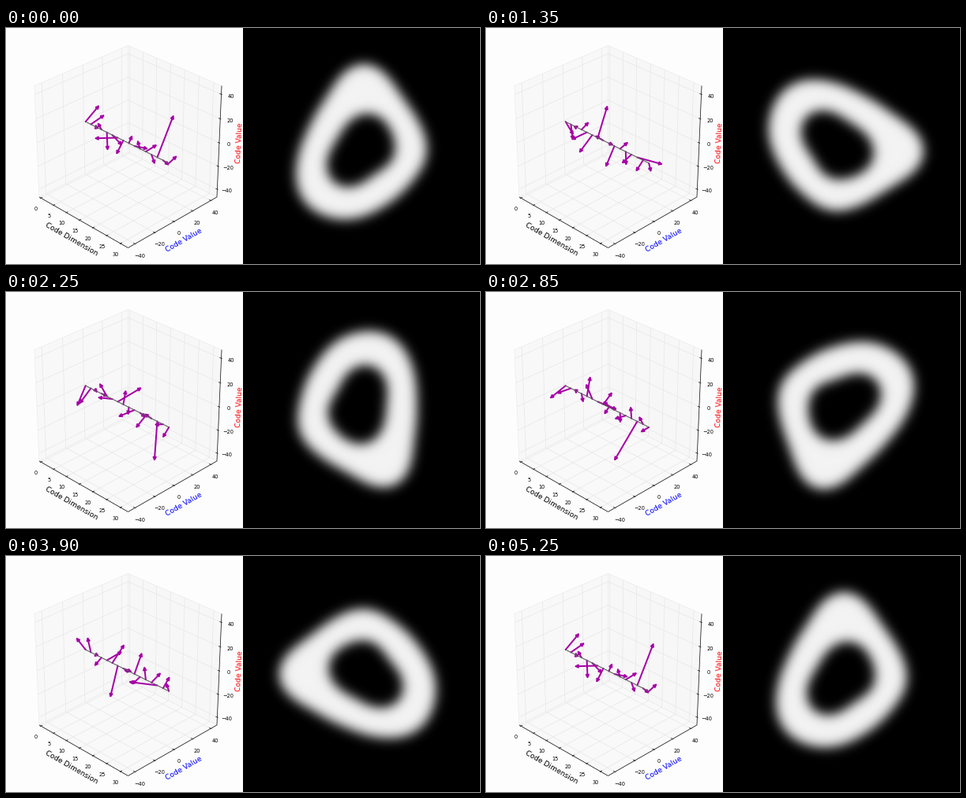
Write a matplotlib script that moves like this. It is 600x300 px and loops after 5400 ms.

```python
import numpy as np
import matplotlib.pyplot as plt
from matplotlib.animation import FuncAnimation
from matplotlib.patches import FancyArrowPatch, Polygon

FRAMES, INTERVAL = 36, 150
PX = 0.72                      # points per pixel at 100 dpi
H = 0.5 * (1 + 1 / 24)         # half extent of the drawn box
PURPLE = "#a600a6"

plt.rcParams["font.family"] = "DejaVu Sans"
fig = plt.figure(figsize=(6, 3), dpi=100, facecolor="#fdfdfd")
ax = fig.add_axes([0, 0, 1, 1])
ax.axis("off")

# 3D view: azimuth -45, elevation 30
AZ, EL = np.radians([-45, 30])
RIGHT = np.array([-np.sin(AZ), np.cos(AZ), 0])
UP = np.array([-np.sin(EL) * np.cos(AZ), -np.sin(EL) * np.sin(AZ), np.cos(EL)])
EYE = np.array([np.cos(EL) * np.cos(AZ), np.cos(EL) * np.sin(AZ), np.sin(EL)])


def project(*p):
    p = np.array(p)
    k = 1567 / (10 - EYE @ p)
    return 154.5 + k * (RIGHT @ p), 146 - k * (UP @ p)


def line(a, b, color, width, z):
    (x0, y0), (x1, y1) = project(*a), project(*b)
    ax.plot([x0, x1], [y0, y1], color=color, lw=width * PX, zorder=z,
            solid_capstyle="butt")


def label(x, y, s, size, color="black", angle=0):
    ax.text(x, y, s, fontsize=size * PX, color=color, rotation=angle,
            ha="center", va="center")


def pane(corners, color):
    ax.add_patch(Polygon([project(*c) for c in corners], fc=color,
                         ec="#ececec", lw=0.7 * PX, zorder=0.1))


pane([(-H, -H, -H), (-H, H, -H), (-H, H, H), (-H, -H, H)], "#f8f8f8")
pane([(-H, H, -H), (H, H, -H), (H, H, H), (-H, H, H)], "#f7f7f7")
pane([(-H, -H, -H), (H, -H, -H), (H, H, -H), (-H, H, -H)], "#f9f9f9")

GRID = dict(color="#e7e7e7", width=0.7, z=0.2)
TICK = dict(color="black", width=0.7, z=0.4)
OUT, IN = H + 0.009, H - 0.0175

for v in range(0, 31, 5):
    t = v / 32 - 0.5
    line((t, -H, -H), (t, H, -H), **GRID)
    line((t, H, -H), (t, H, H), **GRID)
    line((t, -OUT, -H), (t, -IN, -H), **TICK)
    x, y = project(t, -H, -H)
    label(x - 6, y + 13.7, str(v), 6.7)

for v in range(-40, 41, 20):
    t = v / 90
    s = str(v).replace("-", "\u2212")
    line((-H, t, -H), (H, t, -H), **GRID)
    line((-H, t, -H), (-H, t, H), **GRID)
    line((-H, -H, t), (-H, H, t), **GRID)
    line((-H, H, t), (H, H, t), **GRID)
    line((IN, t, -H), (OUT, t, -H), **TICK)
    line((IN, H, t), (OUT, H, t), **TICK)
    x, y = project(H, t, -H)
    label(x + 6, y + 15.3, s, 6.7)
    x, y = project(H, H, t)
    label(x + 12.2, y + 2.3, s, 6.7)

line((-H, -H, -H), (H, -H, -H), "#222222", 0.8, 0.5)
line((H, -H, -H), (H, H, -H), "#222222", 0.8, 0.5)
line((H, H, -H), (H, H, H), "#222222", 0.8, 0.5)

label(83, 268.7, "Code Dimension", 9.15, "black", -30)
label(225, 269.7, "Code Value", 9.15, "blue", 30)
label(295.6, 146.5, "Code Value", 9.15, "red", 87.6)

# code vectors: length and starting angle in degrees
VECTORS = [(.19, 31), (.165, 10), (.03, 100), (.098, 117), (.18, -88),
           (.188, -52), (.283, 159), (.13, -129), (.073, 56), (.188, -30),
           (.1, 108), (.134, 5), (.12, -69), (.365, 60), (.11, -47), (.1, 18)]
STEP = 0.0636

arrows = []
for _ in VECTORS:
    arrow = FancyArrowPatch((0, 0), (1, 1), arrowstyle="-|>", color=PURPLE,
                            mutation_scale=8 * PX, lw=2 * PX,
                            shrinkA=0, shrinkB=0, zorder=1)
    arrows.append(ax.add_patch(arrow))
line((-0.5, 0, 0), (-0.5 + 15 * STEP, 0, 0), "#5c5c5c", 1.1, 2)

# blurred ring: radii of both contours at even angles
OUTER = np.array([85, 81.5, 81, 89, 104.5, 101, 82.5, 74, 73, 79, 90.5, 102,
                  103, 97, 88, 82, 80.5, 83.5]) - 2.5
INNER = np.array([46, 48, 51, 47, 38, 34, 39, 49.5, 52.5, 44, 37, 40.5]) - 1.5
HOLE_X, HOLE_Y = -2, -6
ANGLES = np.linspace(0, 2 * np.pi, 721)


def smooth(knots):
    """Periodic curve through evenly spaced knots."""
    n = len(knots)
    c = np.fft.rfft(knots) / n
    c[1:-1] *= 2
    k = np.arange(len(c))
    return (c * np.exp(1j * np.outer(ANGLES, k))).real.sum(axis=1)


outer, inner = smooth(OUTER), smooth(INNER)
grid = np.arange(300) - 149.5
PXX, PYY = np.meshgrid(grid, -grid)
SIGMA = 7.3
blur = np.exp(-0.5 * ((grid[:, None] - grid) / SIGMA) ** 2)
blur /= SIGMA * np.sqrt(2 * np.pi)


def inside(x, y, radius):
    a = np.arctan2(y, x) % (2 * np.pi)
    return np.clip(np.interp(a, ANGLES, radius) - np.hypot(x, y) + 0.5, 0, 1)


def ring(turn):
    c, s = np.cos(turn), np.sin(turn)
    x, y = PXX * c - PYY * s, PXX * s + PYY * c
    mask = inside(x, y, outer) * (1 - inside(x - HOLE_X, y - HOLE_Y, inner))
    return 0.95 * (blur @ mask @ blur)


image = ax.imshow(ring(0), cmap="gray", vmin=0, vmax=1, zorder=3,
                  extent=(300, 600, 300, 0), interpolation="nearest",
                  aspect="auto")
ax.set_xlim(0, 600)
ax.set_ylim(300, 0)


def update(i):
    turn = 2 * np.pi * i / (FRAMES - 1)
    for k, (arrow, (size, deg)) in enumerate(zip(arrows, VECTORS)):
        a = np.radians(deg) - turn
        x = -0.5 + k * STEP
        arrow.set_positions(project(x, 0, 0),
                            project(x, size * np.cos(a), size * np.sin(a)))
    image.set_data(ring(turn))
    return [*arrows, image]


anim = FuncAnimation(fig, update, frames=FRAMES, interval=INTERVAL,
                     repeat=True, repeat_delay=0, blit=False)
plt.show()
```
